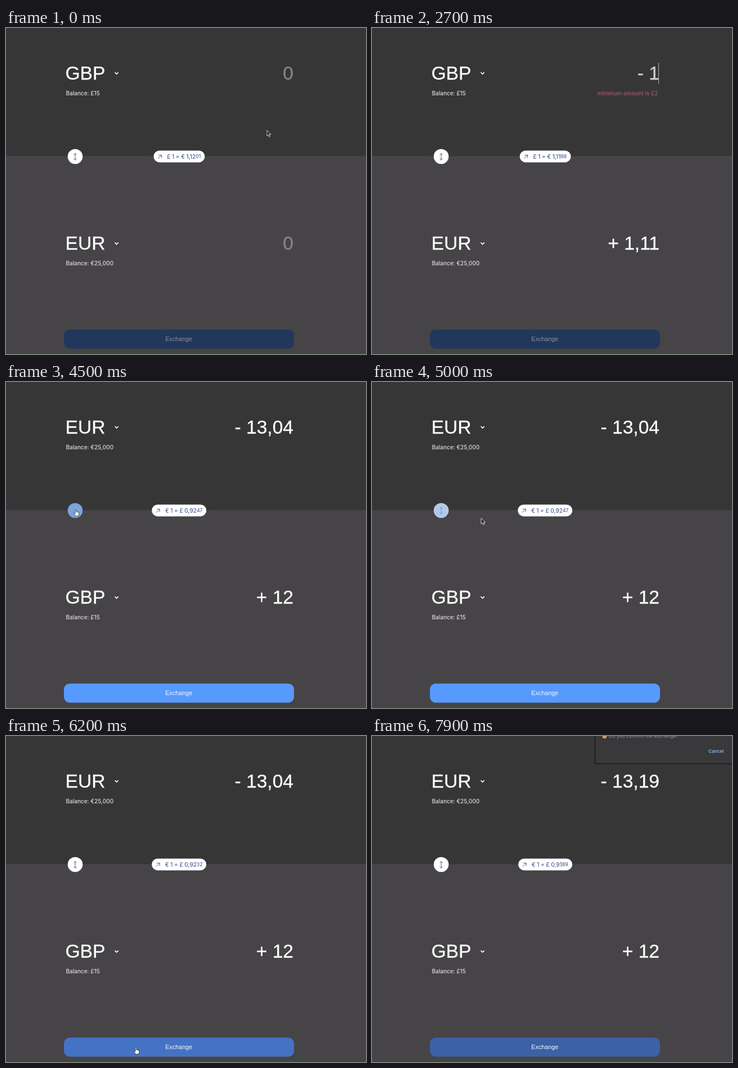
An HTML page for the animation above (8 s loop, 640 px wide and 581 px high).

```html
<!DOCTYPE html>
<html lang="en">
<head>
<meta charset="utf-8">
<title>Currency exchange</title>
<style>
  html, body { margin: 0; width: 100%; height: 100%; overflow: hidden; background: #464447; }
  svg.stage { position: absolute; left: 0; top: 0; display: block; }
  .big { font: 33.6px "Liberation Sans", Arial, sans-serif; fill: #fff; stroke: #fff; stroke-width: .3; }
  .small { font: 500 10px Inter, sans-serif; fill: #dcdbdd; }
  .end { text-anchor: end; }
  .big.empty { fill: #868587; stroke: #868587; }
  .big.invalid { fill: #d0d0d0; stroke: #d0d0d0; }
  .line { fill: none; stroke-linecap: round; stroke-linejoin: round; }

  .pill {
    position: absolute; left: 307.7px; top: 218px; height: 21px; padding: 0 7px;
    transform: translate(-50%, .4px); box-sizing: border-box; border-radius: 10.5px;
    display: flex; align-items: center; white-space: pre;
    background: #fff; color: #4a5f95; font: 500 10px Inter, sans-serif;
  }
  .pill svg { margin-right: 9px; }
  .pill small { font-size: 8.6px; padding-top: 1px; }

  .anim { animation: 8s linear infinite; }
  #error { animation-name: error; fill: #a3586e; }
  #caret { animation-name: caret; animation-timing-function: step-end; }
  #button { animation-name: button; }
  #label { animation-name: label; font: 10.8px "Liberation Sans", Arial, sans-serif; text-anchor: middle; }
  #swap { animation-name: swap; }
  #swapIcon { animation-name: swapIcon; }
  #dialog { animation-name: dialog; animation-timing-function: step-end; }
  #cursor { animation-name: move; animation-timing-function: ease-in-out; }
  #arrow { animation-name: arrow; animation-timing-function: step-end; }
  #hand { animation-name: hand; animation-timing-function: step-end; }

  @keyframes error {
    0%, 15.6% { opacity: 0; }
    17%, 38.1% { opacity: 1; }
    40%, 100% { opacity: 0; }
  }
  @keyframes caret {
    0%, 21.875%, 34.375%, 44.375%, 55% { opacity: 0; }
    9.5%, 28.125%, 38.125%, 50.625% { opacity: 1; }
    100% { opacity: 0; }
  }
  @keyframes button {
    0%, 38.1% { fill: #21375c; }
    41.9%, 70.6% { fill: #579aff; }
    74.4%, 85.6% { fill: #4473c5; }
    88%, 100% { fill: #3b61a6; }
  }
  @keyframes label {
    0%, 38.1% { fill: #8c9098; }
    41.9%, 100% { fill: #f4f8ff; }
  }
  @keyframes swap {
    0%, 53% { fill: #fff; }
    56.8%, 60.6% { fill: #6593d5; }
    64.4%, 100% { fill: #fff; }
  }
  @keyframes swapIcon {
    0%, 53% { stroke: #4a5f90; }
    56.8%, 60.6% { stroke: #9cc1f8; }
    64.4%, 100% { stroke: #4a5f90; }
  }
  @keyframes dialog {
    0% { opacity: 0; }
    86.25%, 100% { opacity: 1; }
  }
  @keyframes move {
    0%, 1.25% { transform: translate(463.5px, 182px); }
    10%, 47.5% { transform: translate(498.5px, 83px); }
    53.75%, 59.5% { transform: translate(124px, 227px); }
    62.5% { transform: translate(194px, 242px); animation-timing-function: ease-out; }
    72.5%, 80% { transform: translate(231px, 555px); }
    85%, 86.25% { transform: translate(233px, 561px); }
    91.5%, 100% { transform: translate(655px, 30px); }
  }
  @keyframes arrow {
    0%, 47.5%, 60.3%, 86.25% { opacity: 1; }
    18.75%, 53.4%, 71%, 91.5%, 100% { opacity: 0; }
  }
  @keyframes hand {
    0%, 60.3%, 86.25%, 100% { opacity: 0; }
    53.4%, 71% { opacity: 1; }
  }
</style>
</head>
<body>
<svg class="stage" width="640" height="581" viewBox="0 0 640 581">
  <rect width="640" height="581" fill="#464447"/>
  <rect width="640" height="228.4" fill="#373637"/>
  <rect y="579" width="640" height="2" fill="#0b6a0b"/>

  <text class="big" id="fromCode" x="105.5" y="91.8"></text>
  <text class="small" id="fromBalance" x="106.5" y="119.7"></text>
  <text class="big end" id="fromValue" x="511" y="91.8"></text>
  <text class="small end anim" id="error" x="508.5" y="119.7">minimum amount is £2</text>
  <rect class="anim" id="caret" x="509" y="62" width="1" height="37" fill="#b4b4b4"/>

  <text class="big" id="toCode" x="105.5" y="395.3"></text>
  <text class="small" id="toBalance" x="106.5" y="423.2"></text>
  <text class="big end" id="toValue" x="511" y="395.3"></text>

  <g class="line" stroke="#fff" stroke-width="1.7">
    <path d="M194 79.5l2.6 2.6 2.6-2.6"/>
    <path d="M194 382.8l2.6 2.6 2.6-2.6"/>
  </g>

  <circle class="anim" id="swap" cx="123" cy="229" r="13.3"/>
  <path class="line anim" id="swapIcon" stroke-width="1" d="M123 223.7v11.6M120.6 226l2.4-2.4 2.4 2.4M120.6 233l2.4 2.4 2.4-2.4"/>

  <rect class="anim" id="button" x="103" y="537.5" width="409" height="34" rx="10"/>
  <text class="anim" id="label" x="307.3" y="557.6">Exchange</text>

  <g class="anim" id="dialog">
    <rect x="395.5" y="-10" width="260" height="60.5" rx="4" fill="#000" opacity=".25"/>
    <rect x="397" y="-10" width="260" height="59" rx="3" fill="#39383a" stroke="#1a1a1b"/>
    <ellipse cx="413.5" cy="0" rx="4" ry="4.5" fill="#c9a66a"/>
    <text class="small" x="421" y="3" style="font-size:8.6px;font-weight:400;fill:#98979a">Do you confirm the exchange?</text>
    <text class="small" x="598" y="30.4" style="font-size:8.2px;font-weight:600;fill:#82b4f2">Cancel</text>
  </g>

  <g class="anim" id="cursor">
    <path class="anim" id="arrow" d="M0 0v10.2l2.4-2.1 1.7 3.8 1.7-.8-1.7-3.6h3.1z" fill="#1c1c1c" stroke="#f2f2f2" stroke-width=".9" stroke-linejoin="round"/>
    <path class="anim" id="hand" d="M-1 .8a1 1 0 0 1 2 0v3.6l3.8.8q1.4.4 1.2 1.8l-.7 3.2-.6 1.8h-5l-2.9-4.2q-.5-1.2.7-1.3l1.5 1.1z" fill="#fff" stroke="#222" stroke-width=".8" stroke-linejoin="round"/>
  </g>
</svg>

<div class="pill">
  <svg width="8" height="8" viewBox="0 0 8 8"><path class="line" stroke="#4a5f95" d="M1 7l6-6M2 1h5v5"/></svg><span id="rate"></span><small id="rateTail"></small>
</div>

<script>
  const LOOP = 8000;
  const GBP = { code: "GBP", sign: "£", balance: "£15" };
  const EUR = { code: "EUR", sign: "€", balance: "€25,000" };

  // Each entry: start time in ms, then the value from there on.
  const rates = [[0, "1,1201"], [750, "1,1014"], [2500, "1,1198"], [4400, "0,9247"], [6000, "0,9232"], [7700, "0,9189"]];
  const typed = [[0, 0], [1250, 1], [3050, 12]];
  const SWAP = 4400;

  const at = (steps, t) => steps.filter(([start]) => start <= t).pop()[1];
  const el = id => document.getElementById(id);
  const put = (id, text) => { if (el(id).textContent !== text) el(id).textContent = text; };
  const money = n => String(Math.round(n * 100) / 100).replace(".", ",");

  function show(side, currency, sign, value) {
    put(side + "Code", currency.code);
    put(side + "Balance", "Balance: " + currency.balance);
    put(side + "Value", value ? sign + " " + money(value) : "0");
    el(side + "Value").classList.toggle("empty", !value);
  }

  function draw(t) {
    const swapped = t >= SWAP;
    const [from, to] = swapped ? [EUR, GBP] : [GBP, EUR];
    const rate = at(rates, t), amount = at(typed, t);
    const shown = Number(rate.slice(0, 4).replace(",", "."));
    show("from", from, "-", swapped ? amount / shown : amount);
    show("to", to, "+", swapped ? amount : amount * shown);
    el("fromValue").classList.toggle("invalid", amount === 1);
    put("rate", `${from.sign} 1 = ${to.sign} ${rate.slice(0, 4)}`);
    put("rateTail", rate.slice(4));
  }

  const start = performance.now();
  function tick() {
    draw((performance.now() - start) % LOOP);
    requestAnimationFrame(tick);
  }
  tick();
</script>
</body>
</html>
```
